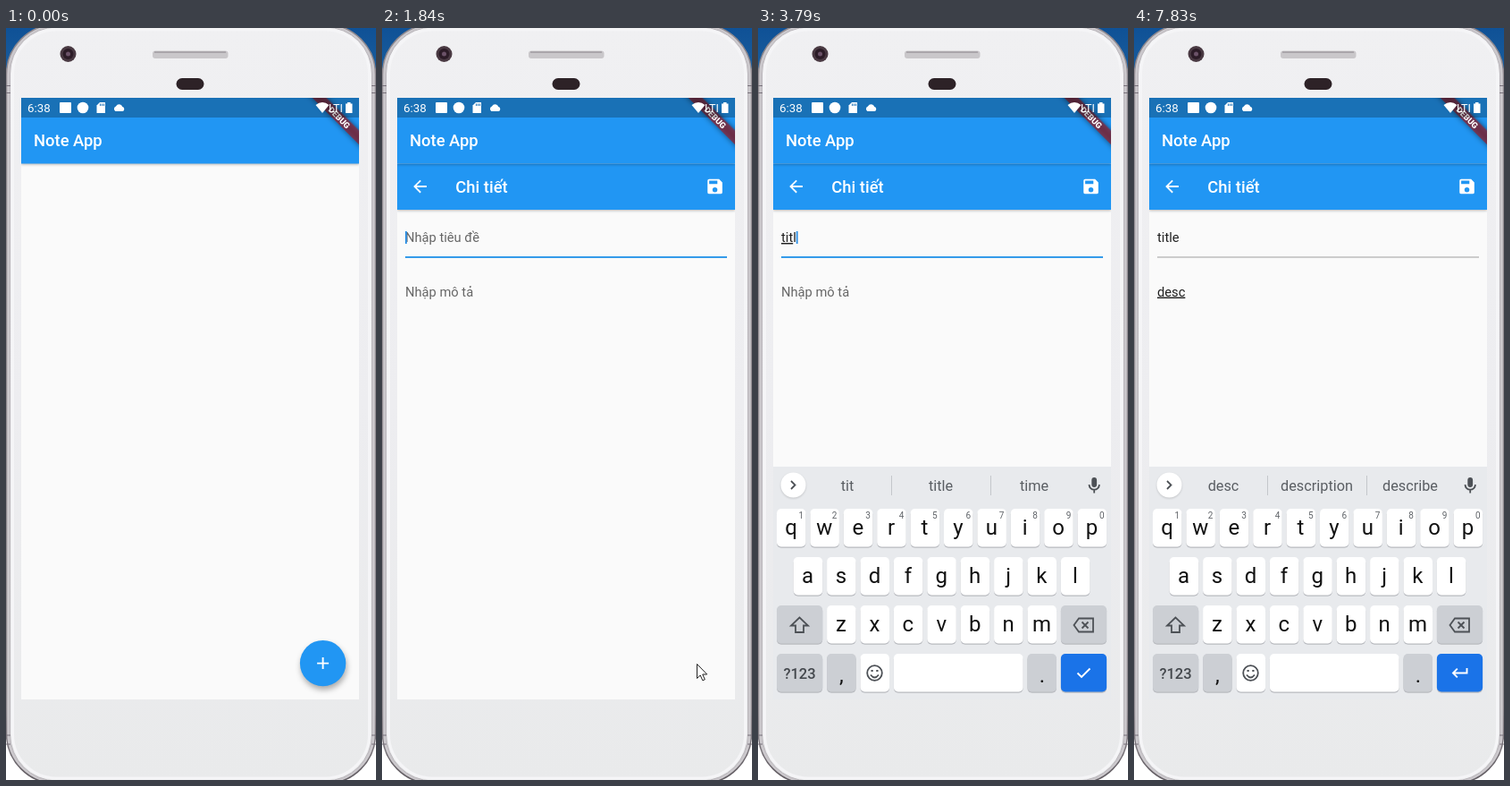
Animation, 414 px wide and 840 px high, one loop 8000 ms. Source, as an HTML page:

```html
<!DOCTYPE html>
<html lang="vi">
<head>
<meta charset="utf-8">
<title>Note App</title>
<style>
  html, body { margin: 0; width: 100%; height: 100%; overflow: hidden; background: #fff; }
  svg { display: block; width: 414px; height: 840px; font-family: Roboto, sans-serif; }
  text { white-space: pre; }
  .bar { fill: #2196f3; filter: drop-shadow(0 1.5px 1.5px rgba(0, 0, 0, .28)); }
  .bar-title { font-size: 18.4px; font-weight: 500; fill: #fff; }
  .field { font-size: 14.7px; fill: #212121; }
  .hint { font-size: 14.7px; fill: #666; }
  .composing { text-decoration: underline; }
  .icon { fill: #5f6368; }
  .line { fill: none; stroke: #4d5156; stroke-width: 1.8; }
  .thin { stroke-width: 1.4; }
  .divider { stroke: #c4c7cb; }
  .letter { font-size: 24px; fill: #111; text-anchor: middle; }
  .digit { font-size: 10px; fill: #5f6368; text-anchor: middle; }
  .suggestion { font-size: 16.3px; fill: #5a5e63; text-anchor: middle; }
</style>
</head>
<body>
<svg viewBox="0 0 414 840">
  <defs>
    <linearGradient id="desk" x2="0" y2="1">
      <stop stop-color="#0f5196"/><stop offset=".15" stop-color="#1c609f"/>
    </linearGradient>
    <linearGradient id="rim" x2="0" y2="1">
      <stop stop-color="#8d878d"/><stop offset=".9" stop-color="#8d878d"/><stop offset="1" stop-color="#5f5a60"/>
    </linearGradient>
    <linearGradient id="shell" x2="0" y2="1">
      <stop stop-color="#f0f0f2"/><stop offset=".5" stop-color="#ededf0"/><stop offset="1" stop-color="#e9eaeb"/>
    </linearGradient>
    <clipPath id="screen"><rect x="17" y="78" width="378" height="672"/></clipPath>
    <clipPath id="fabClip"><circle r="25.7"/></clipPath>
  </defs>

  <rect width="414" height="400" fill="url(#desk)"/>
  <g id="phone">
    <rect x=".5" y="-4" width="413" height="848" rx="56" fill="#cbc8cc" stroke="url(#rim)" stroke-width="1.5"/>
    <rect x="4.5" y="-1" width="405" height="842" rx="52" fill="url(#shell)" stroke="#b9b5ba"/>
    <rect x="7.5" y="2" width="399" height="836" rx="49" fill="none" stroke="#f5f5f7" stroke-width="3"/>
    <path d="M0 64.5h5M0 72.5h5M409 64.5h5M409 72.5h5M0 790h5M0 800h5M409 790h5M409 800h5" stroke="#77717a"/>
    <circle cx="69.500" cy="29" r="9" fill="#4a3a43"/>
    <circle cx="69.500" cy="29" r="6" fill="#2c1c27"/>
    <circle cx="69.500" cy="29" r="2.500" fill="#6b5268"/>
    <rect x="164" y="25.500" width="84.500" height="8.500" rx="3" fill="#c9c7ca"/>
    <path d="M166 27h80" stroke="#aaa6ab" stroke-width="2"/>
    <rect x="190.500" y="56" width="31" height="13" rx="6.500" fill="#2d2227"/>
  </g>

  <g clip-path="url(#screen)">
    <rect x="17" y="78" width="378" height="672" fill="#fafafa"/>

    <g id="page">
      <rect class="bar" x="17" y="151.500" width="378" height="51.500"/>
      <text class="bar-title" x="82.300" y="183.500">Chi tiết</text>
      <g fill="#fff">
        <path transform="translate(31.500 166) scale(.919)" d="M20 11H7.830l5.590-5.590L12 4l-8 8 8 8 1.410-1.410L7.830 13H20z"/>
        <path transform="translate(361.500 166) scale(.919)" fill-rule="evenodd" d="M17 3H5a2 2 0 0 0-2 2v14a2 2 0 0 0 2 2h14a2 2 0 0 0 2-2V7zM12 19a3 3 0 1 1 0-6 3 3 0 0 1 0 6zM15 9H5V5h10z"/>
      </g>
      <path d="M26 256h360" stroke="#bdbdbd" stroke-width="1.500"/>
      <path id="focusLine" d="M26 256h360" stroke="#359bea" stroke-width="2"/>
      <text class="hint" id="titleHint" x="26" y="239">Nhập tiêu đề</text>
      <text class="hint" id="descHint" x="26" y="299.600">Nhập mô tả</text>
      <text class="field" id="title" x="26" y="239"><tspan class="composing"></tspan><tspan></tspan></text>
      <text class="field" id="desc" x="26" y="299.600"><tspan class="composing"></tspan><tspan></tspan></text>
      <rect id="caret" width="1.800" height="14" fill="#2a8fe6"/>
    </g>

    <rect class="bar" x="17" y="78" width="378" height="73.500"/>
    <text class="bar-title" x="31" y="132">Note App</text>
    <g transform="translate(395 78) rotate(45)">
      <rect x="-50" y="25.700" width="100" height="11.300" fill="#9c1c28" fill-opacity=".66" style="filter: drop-shadow(0 0 3px rgba(0, 0, 0, .75))"/>
      <text y="34.700" font-size="9.400" font-weight="900" fill="#fff" text-anchor="middle">DEBUG</text>
    </g>
    <rect x="17" y="78" width="378" height="22" fill-opacity=".25"/>
    <g fill="#fff">
      <text x="24" y="94" font-size="13.300">6:38</text>
      <rect x="60" y="83" width="13" height="12" rx="1"/>
      <circle cx="86" cy="89" r="6.300"/>
      <path d="M105 83h6v12h-9.500v-8.500z"/>
      <path d="M105.500 84.500v2.500m2-2.500v2.500m2-2.500v2.500" stroke="#1970b6"/>
      <path d="M122.500 93a3 3 0 0 1 .5-5.500 4 4 0 0 1 7.300.5 2.600 2.600 0 0 1 .2 5z"/>
      <path d="M346.500 86q7.500-6 15 0l-7.500 9z"/>
      <text x="361" y="94" font-size="12.500">LTI</text>
      <path d="M380 84.500h2V83h3.500v1.500h2V95H380z"/>
    </g>

    <g id="fab">
      <circle r="25.700" fill="#2196f3" style="filter: drop-shadow(1px 4px 3px rgba(0, 0, 0, .32))"/>
      <circle id="ripple" clip-path="url(#fabClip)" fill="#fff" fill-opacity=".24"/>
      <path d="M-6.500 0h13M0-6.500v13" stroke="#fff" stroke-width="1.900"/>
    </g>

    <g id="keyboard">
      <rect x="17" y="490" width="378" height="260" fill="#e8eaed"/>
      <circle cx="39.500" cy="510.500" r="14" fill="#fff" style="filter: drop-shadow(0 1px 1px rgba(0, 0, 0, .16))"/>
      <path id="chevron" class="line" d="M2.500-4.500L-2 0l4.500 4.500"/>
      <g id="tools">
        <circle class="line" cx="88.500" cy="509" r="5"/>
        <path class="line" d="M92 512.500l5.500 5.500"/>
        <path class="line thin" d="M139.500 504h11a1.500 1.500 0 0 1 1.500 1.500v8l-4.500 4.500h-8a1.500 1.500 0 0 1-1.500-1.500v-11a1.500 1.500 0 0 1 1.500-1.500zM152 513h-4.500v5M141.500 511q3 5 6 0M141.500 507.500h2m3 0h2"/>
        <text class="icon" x="199" y="515" font-size="12" font-weight="900" letter-spacing="1" text-anchor="middle">GIF</text>
        <path class="line thin" d="M248 504.500h13v13.500h-13zM251 509h7m-7 3h7m-7 3h5"/>
        <rect class="icon" x="251.500" y="502" width="6" height="4" rx="1"/>
        <path class="divider" d="M287.500 500v21"/>
        <g class="icon"><circle cx="315.500" cy="511" r="2"/><circle cx="321.500" cy="511" r="2"/><circle cx="327.500" cy="511" r="2"/></g>
      </g>
      <g id="suggestions">
        <path class="divider" d="M149.500 500v22M260.500 500v22"/>
        <text class="suggestion" x="100" y="517"></text>
        <text class="suggestion" x="204.500" y="517"></text>
        <text class="suggestion" x="309" y="517"></text>
      </g>
      <rect x="373.300" y="502" width="5.800" height="11" rx="2.900" fill="#4d5156"/>
      <path class="line" d="M370.500 510a5.700 5.700 0 0 0 11.400 0M376.200 515.500v4"/>
      <g id="keys"></g>
      <path class="line" d="M46.500 658.500l-9.500 9h5v7.500h9v-7.500h5z"/>
      <path class="line" d="M359 659.500h16v15h-16l-5.500-7.500zM362.500 663.500l7 7m0-7l-7 7"/>
      <g class="line">
        <circle cx="130.500" cy="720.500" r="8.300"/>
        <path d="M126 722.500q4.500 6 9 0M126.500 718h2.200m3.600 0h2.200"/>
      </g>
      <path id="check" d="M357.500 720.500l4.500 4.500 9.500-9.500" fill="none" stroke="#fff" stroke-width="1.900"/>
      <path id="enter" d="M372.500 715v5.500h-15.500m4.800-4.800l-4.800 4.800 4.800 4.800" fill="none" stroke="#fff" stroke-width="1.900"/>
    </g>
  </g>

  <path id="mouse" d="M.5.5V16.500l3.700-3.500 2.600 5.800 2.500-1.100-2.600-5.700h5z" fill="#fff" stroke="#222"/>
</svg>

<script>
const LOOP = 8000;
const $ = id => document.getElementById(id);
const clamp = v => Math.min(1, Math.max(0, v));
const progress = (t, from, to) => clamp((t - from) / (to - from));
const latest = (steps, t) => steps.findLast(step => step[0] <= t);
const show = (id, on) => $(id).setAttribute('display', on ? 'inline' : 'none');
const move = (id, x, y, scale = 1) =>
  $(id).setAttribute('transform', `translate(${x} ${y}) scale(${scale})`);

function buildKeys() {
  const left = 21, pitch = 37.4, width = 32.5;
  const letter = (x, y, char) => `<text class="letter" x="${x}" y="${y}">${char}</text>`;
  const key = (column, row, span = 1, fill = '#fff') => {
    const x = left + column * pitch, y = 537 + row * 54, w = width + (span - 1) * pitch;
    const box = (dy, color) =>
      `<rect x="${x}" y="${y + dy}" width="${w}" height="42.5" rx="5" fill="${color}"/>`;
    return box(1.2, '#b9bbc0') + box(0, fill);
  };
  let html = '';
  [['qwertyuiop', 0], ['asdfghjkl', .5], ['zxcvbnm', 1.5]].forEach(([chars, start], row) =>
    [...chars].forEach((char, i) => {
      const x = left + (start + i) * pitch + width / 2;
      html += key(start + i, row) + letter(x - .3, 565.5 + row * 54, char);
      if (row === 0) html += `<text class="digit" x="${x + 11}" y="548">${(i + 1) % 10}</text>`;
    }));
  const gray = '#cccfd4';
  html += key(0, 2, 1.5, gray) + key(8.5, 2, 1.5, gray) + key(0, 3, 1.5, gray) + key(1.5, 3, 1, gray)
    + key(2.5, 3) + key(3.5, 3, 4) + key(7.5, 3, 1, gray) + key(8.5, 3, 1.5, '#1a73e8')
    + letter(93.4, 731, ',') + letter(318, 731, '.')
    + '<text x="46.5" y="727" font-size="16.5" font-weight="500" fill="#44484d" text-anchor="middle">?123</text>';
  $('keys').innerHTML = html;
}

const titleTyping = [[0, ''], [3410, 't'], [3490, 'ti'], [3640, 'tit'], [3790, 'titl'], [3960, 'title']];
const descTyping = [[0, ''], [6290, 'd'], [6520, 'de'], [6750, 'des'], [6980, 'desc']];

// time, number of underlined letters, suggested words
const composing = [
  [0, 0, ''],
  [3490, 1, 't to the'], [3640, 2, 'ti to time'], [3790, 3, 'tit title time'],
  [4020, 4, 'titl title time'], [4190, 5, 'title titlle titles'], [4980, 0, 'title titlle titles'],
  [5380, 0, ''],
  [6370, 1, 'd do did'], [6830, 2, 'de dear del'], [7140, 3, 'des design desk'],
  [7290, 4, 'desc description describe']
];

const caretStates = [
  [0, 1], [2110, 0], [2510, 1], [3010, 0], [3410, 1], [4660, 0],
  [5220, 1], [5830, 0], [6290, 1], [7520, 0]
];

// time and tip position; a time alone hides the pointer
const pointer = [
  [0], [610, 365, 767], [690, 352, 745], [840, 353, 734], [920, 354, 724], [990, 354, 717], [1070, 354, 713],
  [1840, 352, 710], [2150, 318, 655], [2230, 190, 470], [2310, 87, 320],
  [2390, 76, 299], [2470, 68, 279], [2550, 63, 269], [2630, 62, 265], [3240],
  [4500, 62, 266], [4660, 65, 270], [4820, 67, 274], [4980, 66, 281], [5060, 64, 291], [5140, 62, 298], [6750],
  [7370, 66, 303], [7450, 100, 340], [7520, 185, 425], [7600, 285, 525], [7680, 350, 590], [7750, 370, 607], [7830]
];

function setField(id, text, underlined) {
  const [head, tail] = $(id).children;
  head.textContent = text.slice(0, underlined);
  tail.textContent = text.slice(underlined);
  show(id + 'Hint', !text);
}

function render(t) {
  const pageOpen = t >= 1530;
  const inDesc = t >= 5220;
  show('page', pageOpen);
  show('fab', t < 1610);
  move('fab', 354.6, 709.6, pageOpen ? .23 : 1);
  $('ripple').setAttribute('r', t < 1300 || pageOpen ? 0 : 12 + 18 * progress(t, 1300, 1400));

  const [, underlined, words] = latest(composing, t);
  setField('title', latest(titleTyping, t)[1], inDesc ? 0 : underlined);
  setField('desc', latest(descTyping, t)[1], inDesc ? underlined : 0);
  $('focusLine').setAttribute('opacity', progress(t, 1610, 1800) * (1 - progress(t, 5440, 5640)));

  const active = $(inDesc ? 'desc' : 'title');
  move('caret', 26 + active.getComputedTextLength(), inDesc ? 287 : 227);
  show('caret', latest(caretStates, t)[1]);

  const remaining = 1 - progress(t, 1880, 2260);
  move('keyboard', 0, 260 * remaining ** 2);
  show('keyboard', remaining < 1);
  show('tools', !words);
  show('suggestions', words);
  const list = words.split(' ');
  $('suggestions').querySelectorAll('text').forEach((node, i) => node.textContent = list[i] || '');
  $('chevron').setAttribute('transform', `translate(39.5 510.5) scale(${words ? -1 : 1} 1)`);
  show('check', !inDesc);
  show('enter', inDesc);

  const [, x, y] = latest(pointer, t);
  show('mouse', x !== undefined);
  if (x !== undefined) move('mouse', x, y);
}

buildKeys();
const start = performance.now();
function frame() {
  render((performance.now() - start) % LOOP);
  requestAnimationFrame(frame);
}
frame();
</script>
</body>
</html>
```
